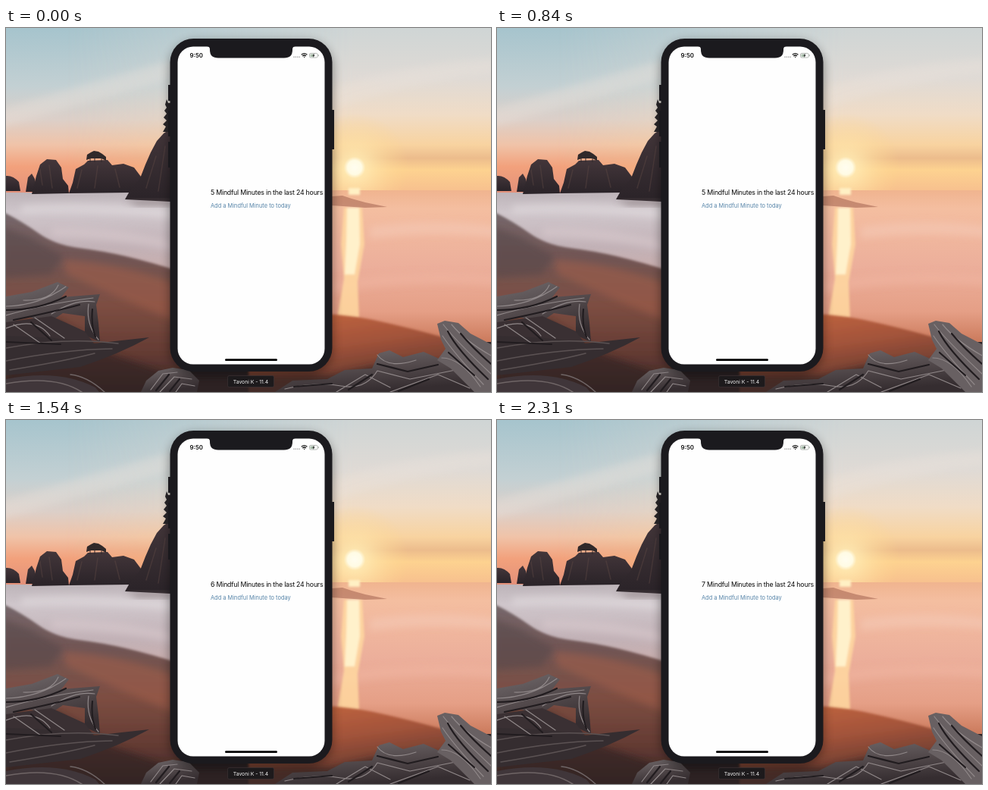
An HTML page for the animation above (2380 ms loop, 640 by 480 pixels).

```html
<!DOCTYPE html>
<html lang="en">
<head>
<meta charset="utf-8">
<title>Mindful Minutes</title>
<style>
html, body { margin: 0; width: 100%; height: 100%; overflow: hidden; background: #2b2325; }
svg { display: block; width: 100%; height: 100%; }
text { font-family: Inter, "Liberation Sans", sans-serif; }
.count { font-size: 8.8px; letter-spacing: -.22px; fill: #0a0a0a; }
.add { font-size: 7.4px; letter-spacing: .02px; fill: #5684a8; }
.soft { filter: url(#soft); }
.haze { filter: url(#haze); }
.grain { fill: none; stroke-linecap: round; stroke-linejoin: round; }
.light { stroke: #908889; stroke-width: 1.2; }
.dark { stroke: #211c1f; stroke-width: 2.2; }

.count, .add { animation: 2380ms step-end infinite; }
.five { animation-name: five; }
.six { animation-name: six; }
.seven { animation-name: seven; }
.add { animation-name: press; }
@keyframes five { 0% { opacity: 1 } 47.05%, 100% { opacity: 0 } }
@keyframes six { 0% { opacity: 0 } 47.05% { opacity: 1 } 79.4%, 100% { opacity: 0 } }
@keyframes seven { 0% { opacity: 0 } 79.4%, 100% { opacity: 1 } }
@keyframes press {
  0% { opacity: 1 }
  38.2% { opacity: .6 }
  41.1% { opacity: .2 }
  47.05% { opacity: .25 }
  49.95% { opacity: .4 }
  52.9% { opacity: .7 }
  55.8% { opacity: .92 }
  58.8% { opacity: 1 }
  67.6% { opacity: .6 }
  70.5% { opacity: .2 }
  82.3% { opacity: .28 }
  85.2% { opacity: .6 }
  91.1% { opacity: .82 }
  94.1% { opacity: .95 }
  97%, 100% { opacity: 1 }
}
</style>
</head>
<body>
<svg viewBox="0 0 640 480" preserveAspectRatio="none">
  <defs>
    <linearGradient id="skyLeft" x2="0" y2="1">
      <stop offset="0" stop-color="#a6c4cd"/>
      <stop offset=".35" stop-color="#c3d0d3"/>
      <stop offset=".55" stop-color="#dccfc8"/>
      <stop offset=".7" stop-color="#f0c3a8"/>
      <stop offset=".83" stop-color="#f2a17c"/>
      <stop offset="1" stop-color="#e28f79"/>
    </linearGradient>
    <linearGradient id="skyRight" x2="0" y2="1">
      <stop offset="0" stop-color="#cfd5d5"/>
      <stop offset=".3" stop-color="#dfdad5"/>
      <stop offset=".52" stop-color="#f0dcc6"/>
      <stop offset=".7" stop-color="#f8d3a0"/>
      <stop offset=".78" stop-color="#ecbc8c"/>
      <stop offset=".85" stop-color="#fdd290"/>
      <stop offset="1" stop-color="#f6bd8e"/>
    </linearGradient>
    <linearGradient id="across">
      <stop offset=".12" stop-color="#fff" stop-opacity="0"/>
      <stop offset=".72" stop-color="#fff"/>
    </linearGradient>
    <mask id="fade"><rect width="640" height="220" fill="url(#across)"/></mask>
    <linearGradient id="sea" x2="0" y2="1">
      <stop offset="0" stop-color="#bdb4b9"/>
      <stop offset=".2" stop-color="#cfc6cb"/>
      <stop offset=".55" stop-color="#c2b2b7"/>
      <stop offset="1" stop-color="#d0aaa4"/>
    </linearGradient>
    <linearGradient id="seaRight" x2="0" y2="1">
      <stop offset="0" stop-color="#f0b48f"/>
      <stop offset=".12" stop-color="#f4bea0"/>
      <stop offset=".5" stop-color="#ecaf9b"/>
      <stop offset=".8" stop-color="#e59f86"/>
      <stop offset="1" stop-color="#cb7a5c"/>
    </linearGradient>
    <linearGradient id="sand" x2="0" y2="1">
      <stop offset="0" stop-color="#76696c"/>
      <stop offset=".25" stop-color="#715554"/>
      <stop offset=".5" stop-color="#7d4e42"/>
      <stop offset=".75" stop-color="#643b33"/>
      <stop offset="1" stop-color="#352525"/>
    </linearGradient>
    <linearGradient id="sandRight" x2=".4" y2="1">
      <stop offset="0" stop-color="#c8683f"/>
      <stop offset=".45" stop-color="#a2533a"/>
      <stop offset="1" stop-color="#4b2f2b"/>
    </linearGradient>
    <linearGradient id="rock" x2="0" y2="1">
      <stop offset="0" stop-color="#43363a"/>
      <stop offset="1" stop-color="#2a2328"/>
    </linearGradient>
    <linearGradient id="wood" x2=".4" y2="1">
      <stop offset="0" stop-color="#716a6c"/>
      <stop offset=".5" stop-color="#544b4d"/>
      <stop offset="1" stop-color="#352d30"/>
    </linearGradient>
    <radialGradient id="glow">
      <stop offset="0" stop-color="#fffdf0"/>
      <stop offset=".13" stop-color="#fffbe4"/>
      <stop offset=".2" stop-color="#ffeab2" stop-opacity=".85"/>
      <stop offset="1" stop-color="#ffd58c" stop-opacity="0"/>
    </radialGradient>
    <filter id="soft" x="-30%" y="-30%" width="160%" height="160%"><feGaussianBlur stdDeviation="5"/></filter>
    <filter id="haze" x="-30%" y="-30%" width="160%" height="160%"><feGaussianBlur stdDeviation="1.6"/></filter>
    <filter id="shadow" x="-30%" y="-30%" width="160%" height="160%"><feGaussianBlur stdDeviation="7"/></filter>
  </defs>

  <!-- sky -->
  <rect width="640" height="220" fill="url(#skyLeft)"/>
  <rect width="640" height="220" fill="url(#skyRight)" mask="url(#fade)"/>
  <g class="soft" fill="#ece3dc" opacity=".35">
    <path d="M-10 108Q100 75 220 42V66Q110 98-10 132Z"/>
    <path d="M430 80Q520 48 650 40V58Q530 72 430 108Z"/>
  </g>
  <circle cx="460" cy="184" r="72" fill="url(#glow)"/>

  <!-- water -->
  <rect y="217" width="325" height="130" fill="url(#sea)"/>
  <rect x="325" y="214" width="315" height="200" fill="url(#seaRight)"/>
  <g class="soft">
    <path d="M20 234Q110 227 220 238V252Q110 240 20 245Z" fill="#e2dbde" opacity=".6"/>
    <path d="M60 264Q140 262 220 281V294Q140 276 60 275Z" fill="#dccccf" opacity=".5"/>
    <path d="M480 262Q570 250 650 262V276Q550 268 480 278Z" fill="#f7cfbd" opacity=".45"/>
    <path d="M430 334Q540 317 650 326V340Q540 330 430 350Z" fill="#f1b9a5" opacity=".45"/>
  </g>
  <g class="haze">
    <path d="M446 237H470L473 285 464 335 466 383H437L446 330 442 285Z" fill="#ffd9a0" opacity=".85"/>
    <path d="M450 237H466L467 285 460 325H447L449 280Z" fill="#fff1cb"/>
    <path d="M452 211H467V220H452Z" fill="#fff0c4"/>
  </g>
  <path d="M430 222L444 221 456 225 474 230 503 236 474 237 430 234Z" fill="#a96a55" opacity=".6"/>

  <!-- beach -->
  <path d="M-9 240Q20 254 42 270T96 290 158 301 230 321V490H-9Z" fill="url(#sand)" class="haze"/>
  <path class="soft" d="M75 305Q150 310 220 336V385Q150 356 80 325Z" fill="#a5614c" opacity=".5"/>
  <path class="soft" d="M-5 262L30 275 75 300 60 325-5 330Z" fill="#54464a" opacity=".55"/>
  <path class="haze" d="M320 374Q435 374 485 385T570 406L650 428V490H320Z" fill="url(#sandRight)"/>

  <!-- sea stacks -->
  <g fill="url(#rock)">
    <path d="M0 195Q9 194 17 203L19 215H0Z"/>
    <path d="M26 216L29 197 34 192 38 199 40 216Z"/>
    <path d="M34 219L40 195 45 180 54 173 66 174 73 184 75 199 82 208 83 218Z"/>
    <path d="M83 218L88 204 92 186 103 180 108 175 134 174 140 181 155 179 169 184 178 196 180 207 164 217Z"/>
    <path d="M157 226L165 212 177 198 184 180 191 164 199 149 208 139 217 133V229Z"/>
  </g>
  <path d="M106 174L107 167 112 164 116 162 122 163 127 166 132 170 132 175 126 172 112 172Z" fill="#30292a"/>
  <path d="M111 170V177M117 166V177M126 169V177" stroke="#30292a"/>
  <path d="M212 94L214 99 217 99V137H207L211 130 207 127 212 122 208 118 212 113 209 109 212 105 210 101Z" fill="#292629"/>
  <path d="M45 187L48 207M57 181L61 211M100 187L94 211M121 182L117 211M144 186L150 210M198 169L185 211M210 156L201 215" class="grain" stroke="#614b46" stroke-width="1.5" opacity=".4"/>
  <path class="soft" d="M157 227H217V234H174Z" fill="#665659" opacity=".5"/>

  <!-- driftwood -->
  <path class="soft" d="M0 385L70 385 140 430 220 458H430L510 440 640 445V490H0Z" fill="#2d2224" opacity=".65"/>
  <path d="M0 354L34 348 68 335 83 342 73 355 124 351 119 365 122 389 124 414 104 405 104 380 75 376 56 389 30 381 0 390Z" fill="url(#wood)"/>
  <path d="M0 388L60 380 104 400 116 416 60 425 0 410Z" fill="#3a3033"/>
  <path d="M0 406Q68 407 116 416L189 408Q149 430 98 447L0 458Z" fill="#352d30"/>
  <path d="M0 422Q80 407 148 416M0 439Q75 424 140 423M5 451Q74 440 117 429" class="grain" stroke="#5b5253" stroke-width="1.5"/>
  <path d="M0 367Q44 366 79 341M0 379Q50 364 115 356M23 359Q60 360 69 339M60 377Q91 357 117 361M109 364Q105 391 122 411M0 396Q39 380 58 406M10 391L46 416M38 382L77 409" class="grain light"/>
  <path d="M0 372Q43 372 79 354M10 385Q64 374 97 365M114 371Q112 392 118 407M0 414L72 417M33 388L60 412" class="grain dark"/>
  <path d="M0 463Q70 449 118 474L123 480H0Z" fill="#40363a"/>
  <path d="M85 457Q107 459 130 480M0 469Q65 457 100 480" class="grain" stroke="#6f6566" stroke-width="1.5"/>

  <path d="M178 480L185 465 201 452 220 448 241 451 255 465 252 480Z" fill="url(#wood)"/>
  <path d="M191 477L207 456 226 454M203 480L222 460 245 463M224 480L232 469 249 472" class="grain light"/>
  <path d="M198 478L215 457M216 479L229 463" class="grain dark"/>
  <path d="M355 480L378 465 424 463 447 451 483 449 492 429 506 425 524 434 551 427 576 438 640 450V480Z" fill="url(#wood)"/>
  <path d="M368 476Q410 466 442 472T490 452L533 463 603 449M436 480L474 457 507 474M490 431Q504 450 541 438M507 480L570 457 612 475" class="grain light"/>
  <path d="M380 473L430 469M452 477L483 457M490 443L530 453 570 444M518 479L558 463" class="grain dark"/>
  <path d="M569 390L579 386 597 389 613 403 640 417V480H618L587 449 569 438 580 423 574 411Z" fill="#686062"/>
  <path d="M577 391Q593 412 640 456M588 391Q605 412 640 432M576 406Q592 430 630 470M575 435Q600 435 626 473" class="grain light"/>
  <path d="M583 400Q595 424 636 463M600 403Q615 421 640 443M584 428L618 458" class="grain dark"/>

  <!-- phone -->
  <rect x="216" y="18" width="215" height="440" rx="34" fill="#000" opacity=".4" filter="url(#shadow)"/>
  <path d="M214 75h4v21h-4zM214 109h4v34h-4zM214 150h4v34h-4zM429 108h4v52h-4z" fill="#1a191d"/>
  <rect x="216.5" y="14" width="214" height="439" rx="31" fill="#1b1a1e"/>
  <rect x="226.5" y="24.5" width="194" height="419" rx="20.5" fill="#fefefe"/>
  <path d="M265 24Q269 24.5 269 28V29Q269 39.5 280 39.5H367Q378 39.5 378 29V28Q378 24.5 382 24Z" fill="#1b1a1e"/>
  <rect x="289" y="436.3" width="69" height="2.8" rx="1.4" fill="#050505"/>

  <!-- status bar -->
  <text x="242.6" y="39" font-size="7.8" font-weight="600" fill="#111">9:50</text>
  <path d="M379.3 38.2H388" stroke="#aaa" stroke-width="1.4" stroke-dasharray="1.4 1"/>
  <g fill="none" stroke="#151515" stroke-width="1.3">
    <path d="M389.8 35.3Q393.6 32 397.4 35.3M391.3 37Q393.6 35 395.9 37"/>
    <path d="M393 38.4H394.2"/>
  </g>
  <rect x="400.5" y="33.4" width="10.6" height="5.6" rx="1.6" fill="#fff" stroke="#a0a5a0" stroke-width=".8"/>
  <rect x="401.5" y="34.4" width="4.7" height="3.6" rx=".7" fill="#a9bfac"/>
  <path d="M406.8 33.6L404.2 36.6H405.7L405 39 407.7 35.8H406.2Z" fill="#222"/>
  <path d="M412.3 35.2V37.2" stroke="#a0a5a0" stroke-width=".9"/>

  <!-- app -->
  <text class="count five" x="270" y="219.8">5 Mindful Minutes in the last 24 hours</text>
  <text class="count six" x="270" y="219.8">6 Mindful Minutes in the last 24 hours</text>
  <text class="count seven" x="270" y="219.8">7 Mindful Minutes in the last 24 hours</text>
  <text class="add" x="270" y="236.5">Add a Mindful Minute to today</text>

  <!-- device label -->
  <rect x="292.5" y="458.5" width="61" height="15" rx="2" fill="#1d1a1c" stroke="#403638" stroke-width=".6"/>
  <text x="323" y="468.7" font-size="6.8" text-anchor="middle" fill="#f2f2f2">Tavoni K - 11.4</text>
</svg>
</body>
</html>
```
